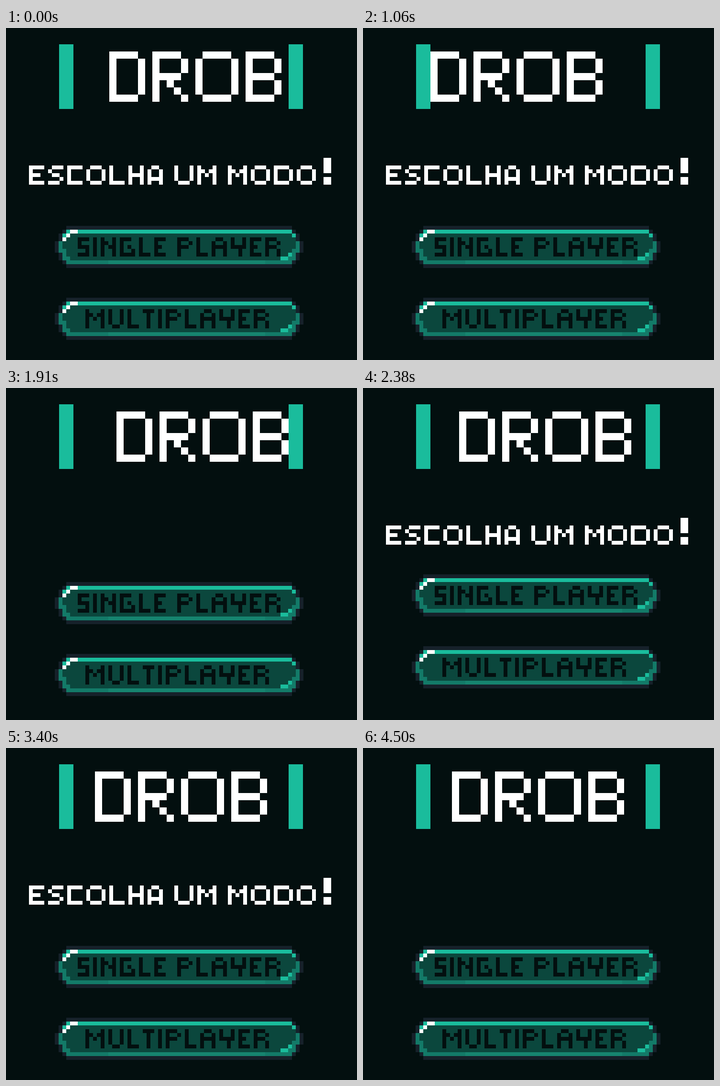
These frames come from a looping animation (734x693 px, 4580 ms). An HTML page:

```html
<!DOCTYPE html>
<html lang="pt">
<head>
<meta charset="utf-8">
<title>Menu</title>
<style>
  html, body { margin: 0; width: 100%; height: 100%; overflow: hidden; background: #030f0f; }
  svg { display: block; width: 100vw; height: 100vh; }
</style>
</head>
<body>
<svg id="stage" viewBox="0 0 734 693" shape-rendering="crispEdges"></svg>
<script>
const NS = 'http://www.w3.org/2000/svg';
const COLOR = {
  bg: '#030f0f', teal: '#1abc9c', white: '#ffffff',
  edge: '#16212a', fill: '#0b473d', mid: '#137a68', low: '#16846f'
};

// Pixel fonts: rows separated by slashes, "1" is a filled cell.
const shared = {
  ' ': '.',
  M: '1...1/11.11/1.1.1/1...1/1...1'
};
const wide = {
  ...shared,
  E: '1111/1.../111./1.../1111',
  S: '.111/1.../.11./...1/111.',
  C: '1111/1.../1.../1.../1111',
  O: '.111./1...1/1...1/1...1/.111.',
  L: '1.../1.../1.../1.../1111',
  H: '1..1/1..1/1111/1..1/1..1',
  A: '.11./1..1/1..1/1111/1..1',
  U: '1...1/1...1/1...1/1...1/.111.',
  D: '1111./1...1/1...1/1...1/1111.',
  '!': '.11/.11/.11/.11/.../.11/.11'
};
const narrow = {
  ...shared,
  S: '111/1../111/..1/111',
  I: '1/1/1/1/1',
  N: '1..1/11.1/1.11/1..1/1..1',
  G: '111./1.../1.1./1..1/1111',
  L: '1../1../1../1../111',
  E: '111/1../11./1../111',
  P: '111./1..1/111./1.../1...',
  A: '.11./1..1/1111/1..1/1..1',
  Y: '1..1/1..1/1111/..1./..1.',
  R: '111./1..1/111./1..1/1..1',
  U: '1..1/1..1/1..1/1..1/.11.',
  T: '111/.1./.1./.1./.1.'
};
const tall = {
  D: '1111./1...1/1...1/1...1/1...1/1...1/1111.',
  R: '1111./1...1/1...1/1111./1.1../1..1./1...1',
  O: '.1111./1....1/1....1/1....1/1....1/1....1/.1111.',
  B: '1111./1...1/1...1/1111./1...1/1...1/1111.'
};

const stage = document.getElementById('stage');

function add(parent, tag, attrs) {
  const el = document.createElementNS(NS, tag);
  for (const key in attrs) el.setAttribute(key, attrs[key]);
  parent.appendChild(el);
  return el;
}

function rect(parent, x, y, width, height, fill) {
  return add(parent, 'rect', { x, y, width, height, fill });
}

// Draws a line of pixel text whose bottom edge lies on y.
function write(parent, text, font, x, y, cell, fill) {
  let d = '', col = 0;
  for (const ch of text) {
    const rows = font[ch].split('/');
    rows.forEach((row, r) => {
      for (const run of row.matchAll(/1+/g)) {
        const w = run[0].length * cell;
        d += `M${x + (col + run.index) * cell} ${y + (r - rows.length) * cell}h${w}v${cell}h${-w}z`;
      }
    });
    col += rows[0].length + 1;
  }
  const g = add(parent, 'g', { role: 'img', 'aria-label': text });
  add(g, 'path', { d, fill });
  return g;
}

function button(parent, y, text, textX) {
  const g = add(parent, 'g', { transform: `translate(102 ${y}) scale(8)` });
  const box = (x, y, w, h, color) => rect(g, x, y, w, h, COLOR[color]);
  const pair = (x, y, w, h, color) => {
    box(x, y, w, h, color);
    box(65 - x - w, y, w, h, color);
  };
  // Body
  box(3, 0, 59, 11, 'edge');
  box(2, 1, 61, 9, 'edge');
  box(1, 2, 63, 7, 'edge');
  box(0, 4, 65, 3, 'edge');
  box(2, 2, 61, 7, 'fill');
  // Rim
  box(3, 1, 59, 1, 'teal');
  pair(2, 2, 1, 1, 'teal');
  pair(1, 4, 1, 3, 'mid');
  pair(2, 6, 1, 3, 'mid');
  pair(3, 8, 1, 1, 'mid');
  box(3, 9, 59, 1, 'mid');
  box(14, 9, 41, 1, 'low');
  // Glints
  box(4, 1, 2, 1, 'white');
  box(3, 2, 1, 1, 'white');
  box(2, 3, 1, 1, 'white');
  box(61, 7, 1, 1, 'teal');
  box(59, 8, 2, 1, 'teal');
  write(parent, text, narrow, textX, y + 64, 8, COLOR.bg);
}

rect(stage, 0, 0, 734, 693, COLOR.bg);
const title = write(stage, 'DROB', tall, 0, 154, 15, COLOR.white);
for (const x of [111, 591]) rect(stage, x, 34, 30, 135, COLOR.teal);
const prompt = write(stage, 'ESCOLHA UM MODO!', wide, 48, 327, 8, COLOR.white);
const menu = add(stage, 'g', {});
button(menu, 389, 'SINGLE PLAYER', 150);
button(menu, 539, 'MULTIPLAYER', 166);

const LOOP = 4580;
const menuSteps = [120, 350, 580, 750, 900, 1050, 1300, 1450, 1600, 1750, 1910, 2080, 2230,
  2390, 2610, 2780, 2930, 3080, 3250, 3400, 3630, 3800, 3950, 4100, 4270, 4420];
// The title sometimes moves one tick after the menu.
const late = [350, 900, 1050, 1600, 1750, 2080, 2230, 2390, 4420];
const titleSteps = menuSteps.map(t => late.includes(t) ? t + 80 : t);
const blinks = [430, 1050, 1600, 2230, 2780, 3400, 3950];

const passed = (times, t) => times.filter(s => s <= t).length;
const bounce = (n, top) => top - Math.abs(top - n % (2 * top));

function draw(t) {
  const titleX = 141 + 15 * bounce(7 + passed(titleSteps, t), 6);
  const menuY = 8 * bounce(7 + passed(menuSteps, t), 5);
  title.setAttribute('transform', `translate(${titleX} 0)`);
  menu.setAttribute('transform', `translate(0 ${menuY})`);
  prompt.setAttribute('visibility', passed(blinks, t) % 2 ? 'hidden' : 'visible');
}

const start = performance.now();
function tick() {
  draw((performance.now() - start) % LOOP);
  requestAnimationFrame(tick);
}
draw(0);
requestAnimationFrame(tick);
</script>
</body>
</html>
```
